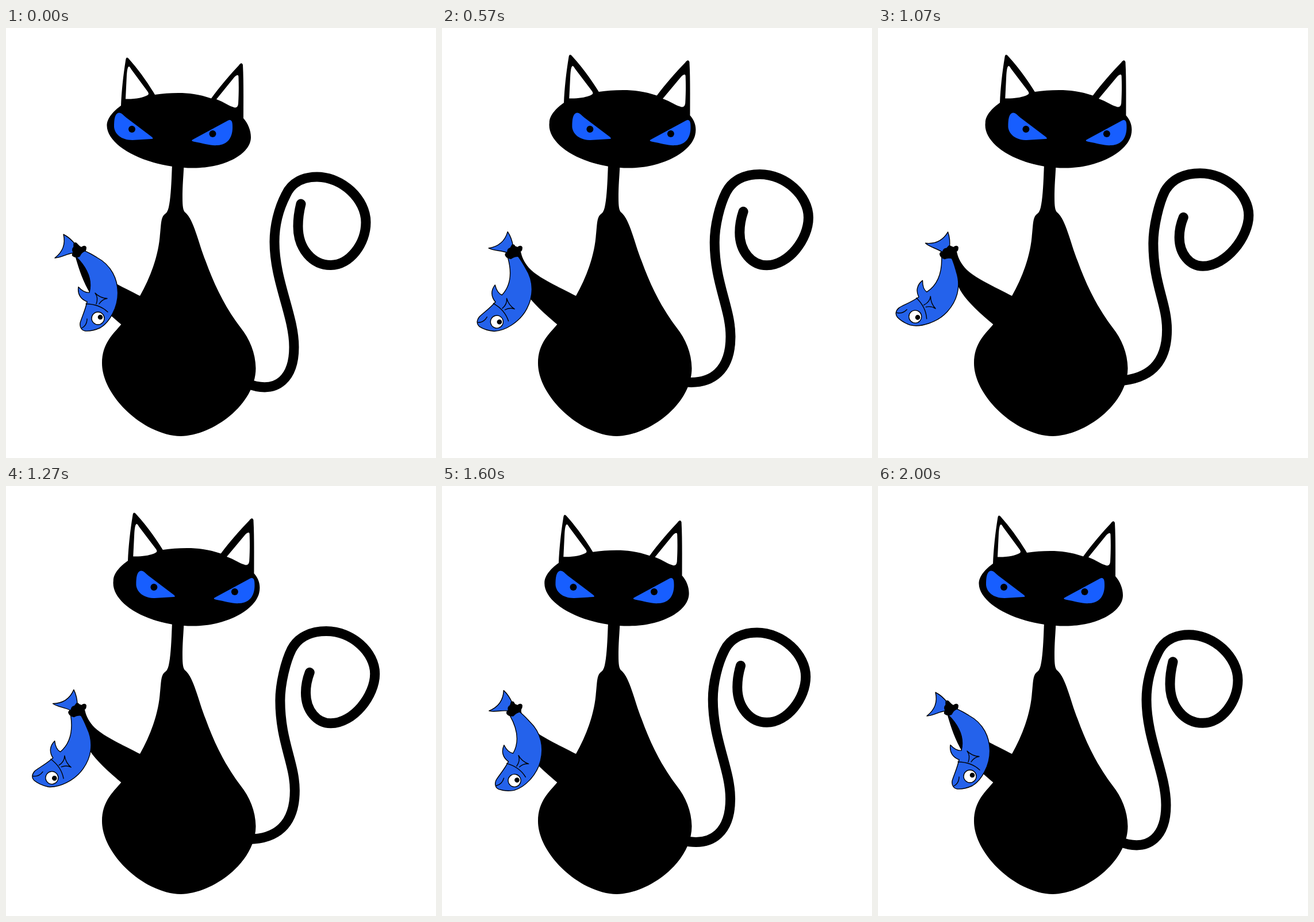
Animation of 748x748 px, one loop 2.03 s. Source, as an HTML page:

```html
<!DOCTYPE html>
<html lang="en">
<head>
<meta charset="utf-8">
<title>Cat with fish</title>
<style>
  html, body { margin: 0; width: 100%; height: 100%; overflow: hidden; background: #fff; }
  svg { display: block; width: 100vw; height: 100vh; }
</style>
</head>
<body>
<svg viewBox="0 0 748 748">
  <path id="tail" fill="none" stroke="#000" stroke-width="17" stroke-linecap="round"/>

  <!-- body and neck -->
  <path d="M289,236 C288,262 287,295 283,312 Q281,321 276,324 C269,330 270,342 267.5,364
    C264,400 250,436 233,466 L200,516 C187,532 167,548 167,583 C167,640 240,709 304,710
    C360,709 434,655 434.5,592 C434,565 424,541 408,521 C381,486 362,446 347.5,406
    C334,372 327,334 312,321 C308,318 307,310 307,295 C307,270 309,255 309.5,236Z"/>

  <!-- arm -->
  <path d="M235,467 C200,449 165,433 151,417 C142,406 139,398 137,389 L122,386 L120,396
    C125,412 130,432 143,456 C152,472 172,492 202,517Z"/>

  <path id="head"/>
  <path id="ears" fill="#fff"/>
  <g id="eyes">
    <g fill="#175eff">
      <path d="M196,147.5 C201,147 204,152 212,158 L253,189 Q258,193 253,193 L220,195
        C200,195 189,184 188,172 C188,160 189,149 196,147.5Z"/>
      <path d="M325,194 L386,161 C392,158 394,163 394,170 C395,190 386,203 368,204
        C355,205 345,201 326,197.5 Q321,196 325,194Z"/>
    </g>
    <circle cx="219" cy="176" r="6"/>
    <circle cx="359.5" cy="184" r="6"/>
  </g>

  <g id="fish" stroke="#000" stroke-width="1.4" stroke-linejoin="round" stroke-linecap="round">
    <g fill="#2462eb">
      <path d="M100,359 C104,376 98,390 85,400 C96,400 104,393 118,391 L121,377 C114,368 108,363 100,359Z"/>
      <path d="M128,385 C137,386 148,393 158,399 C184,413 194,437 194.5,460 C195,486 180,512 164,521.5
        C154,526 146,527.5 138,527 C131,526 128,520 129,513 C131,505 138,491 141,476
        C130,472 124,463 126,450.5 C132,457 138,461 145,460 C150,440 144,420 122,398Z"/>
    </g>
    <g fill="none">
      <path d="M139,480 Q162,480 177,494"/>
      <path d="M157,480 Q161,469 155,461 Q164,470 176,470.5 Q167,472 162,480"/>
      <path d="M132,522 Q141,517 141,506"/>
    </g>
    <circle cx="160" cy="505" r="11" fill="#fff"/>
    <circle cx="164" cy="503" r="3.6"/>
    <path d="M118,375 Q121,372 124,376 L130,382 L138,383 L138,387 Q131,390 128,397
      Q122,400 117,397 Q114,395 117,390 Q114,385 118,381Z"/>
  </g>

  <!-- thumb -->
  <path d="M122,380 Q128,378 131,381 Q138,376 140,382 Q140,386 138,388.5 L128,391Z"/>
</svg>
<script>
const LOOP = 2030, STEP = 100 / 3, PEAK = 1000;
const $ = id => document.getElementById(id);

const HEAD = `M200,135 C188,144 175.5,156 175.5,170 C176,206 246,243.5 326,243.5
  C381,243.5 426,219 426,190 C426,178 421,166 413,157 C413,125 413.5,92 412,64 Q410,58 405,65
  C390,81 372,102 357,122.5 C335,115 318,113 300,113 C285,113 272,114 259,116
  C246,94 230,72 214,54 Q209,48 208,57 C204,82 201,110 200,135Z`;
const EARS = `M214,67 Q211,67 210,82 L208,123.5 C225,124 239,121 246,117 Q250,115 246,110 L218,72 Q215,67 214,67Z
  M403,82 Q400,82 396,87 L366,124 C380,129 388,136 398,138.5 Q403,139 404,132 C405,115 405,99 404.5,86 Q404.5,82 403,82Z`;
const TAIL_LOW = `M418,618 C475,640 501,605 501,555 C501,500 467,440 467,372
  C467,345 474,315 487,290 C497,268 518,259 541,259 C585,259 626,298 626,338
  C626,375 598,412.5 565,412.5 C533,412.5 508,384 508,345 C508,332 510,318 513,306`;
const TAIL_HIGH = `M418,614 C470,613 502.5,587 502.5,527 C502.5,480 478,445 478,375
  C478,345 488,305 498,285 C510,263 533,253.5 559,253.5 C604,253.5 643.5,290 643.5,327
  C643.5,365 605,414.5 565,414.5 C542,414.5 523,393 523,363 C523,351 526,338 530,328`;

const clamp = v => Math.min(1, Math.max(0, v));
const ease = (t, a, b) => { const u = clamp((t - a) / (b - a)); return u * u * (3 - 2 * u); };
const points = path => [...path.matchAll(/([\d.]+),([\d.]+)/g)].map(m => [+m[1], +m[2]]);
const high = points(TAIL_HIGH);

// Rewrites each point of a path through fn(x, y, index).
function warp(path, fn) {
  let i = 0;
  return path.replace(/([\d.]+),([\d.]+)/g, (_, x, y) =>
    fn(+x, +y, i++).map(v => v.toFixed(2)).join(','));
}

function draw(t) {
  const swing = ease(t, 0, PEAK) - ease(t, PEAK, 2 * PEAK);

  // The fish leaves its rest pose with some speed already.
  const u = clamp(t / PEAK);
  const angle = 44 * (swing + 0.6 * u * (1 - u) ** 2);
  $('fish').setAttribute('transform', `rotate(${angle} 116 384)`);

  const s = 1.09 * swing;
  const lift = t < PEAK ? 1.2 * Math.sin(Math.PI * Math.min(1, t / 830))
                        : 2 * Math.sin(Math.PI * (t - PEAK) / (LOOP - PEAK));
  $('tail').setAttribute('d', warp(TAIL_LOW, (x, y, i) => [
    x + (high[i][0] - x) * s,
    y + (high[i][1] - y) * s - (y < 420 ? lift : 0)
  ]));

  // The head turns: its top shifts while the chin stays on the neck.
  const turn = ease(t, 333, 567) - ease(t, 1433, 1680);
  const lean = (shift, rise) => (x, y) => {
    const w = turn * clamp((243 - y) / 70);
    return [x + (shift + (x - 200) / 33) * w, y - rise * w];
  };
  $('head').setAttribute('d', warp(HEAD, lean(12, 5)));
  $('ears').setAttribute('d', warp(EARS, lean(13, 1)));
  $('eyes').setAttribute('transform', `translate(${38.4 * turn} 0)`);
}

function tick() {
  const t = performance.now() % LOOP;
  draw(Math.floor((t + 3.4) / STEP) * STEP);
  requestAnimationFrame(tick);
}
tick();
</script>
</body>
</html>
```
